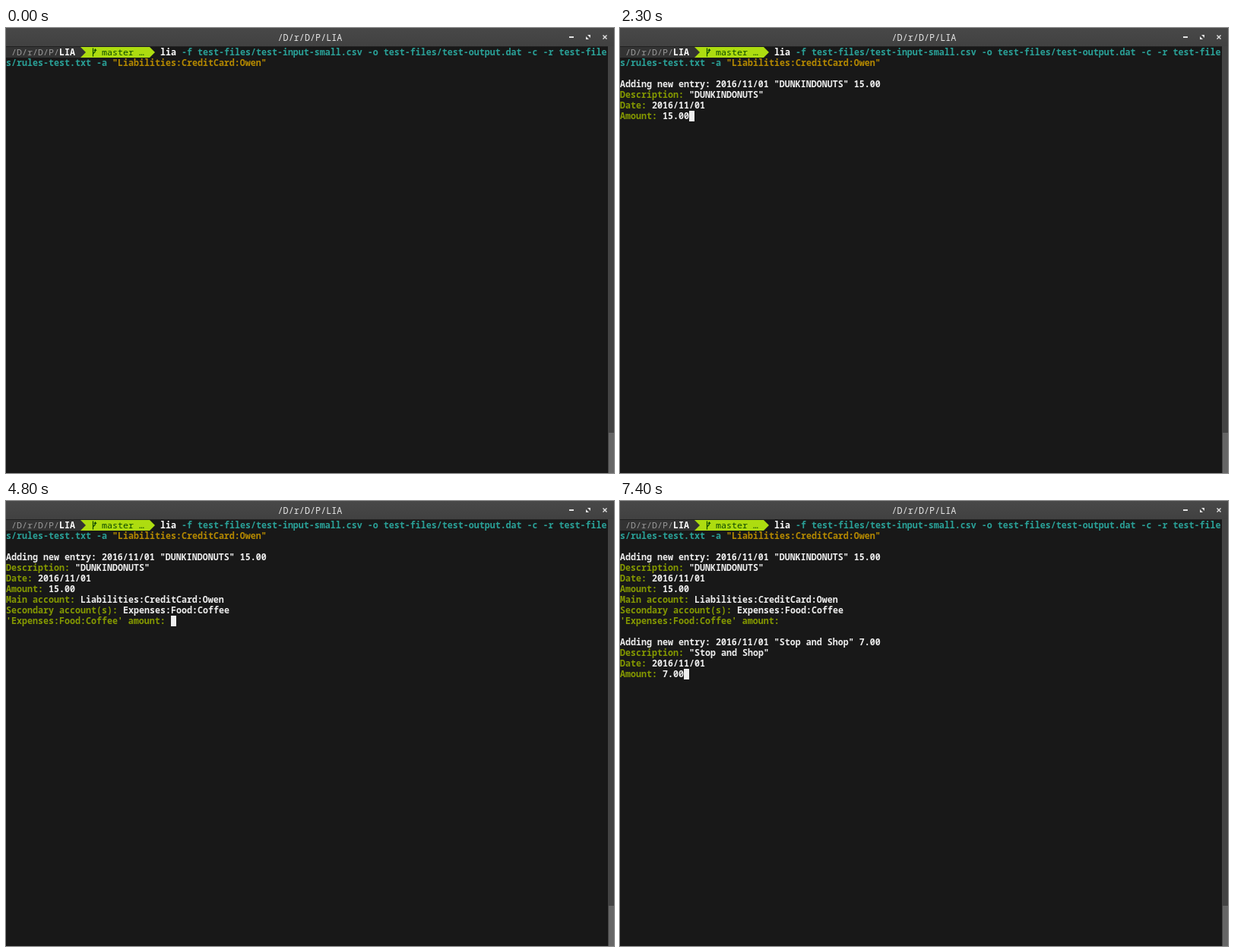
These frames come from a looping animation (800 by 586 pixels, 8000 ms). An HTML page:

```html
<!DOCTYPE html>
<html lang="en">
<head>
<meta charset="utf-8">
<title>Terminal</title>
<style>
  html, body { margin: 0; width: 100%; height: 100%; overflow: hidden; background: #181818; }
  svg { display: block; width: 800px; height: 586px; }
  text { font: 700 11.667px "Noto Sans Mono", "DejaVu Sans Mono", monospace; white-space: pre; }
  .title { font-weight: 500; font-size: 11.8px; fill: #e4e4e4; }
  .path { font-weight: 500; }
</style>
</head>
<body>
<svg id="stage" viewBox="0 0 800 586">
  <defs>
    <linearGradient id="bar" x2="0" y2="1">
      <stop stop-color="#484848"/>
      <stop offset="1" stop-color="#414141"/>
    </linearGradient>
  </defs>
  <rect width="800" height="586" fill="#181818"/>
  <rect width="800" height="24" fill="url(#bar)"/>
  <rect y="24" width="800" height="1" fill="#202020"/>
  <text class="title" x="357.5" y="17">/D/r/D/P/LIA</text>
  <g stroke="#e4e4e4" fill="none">
    <path d="M741 12h6" stroke-width="2"/>
    <path d="M785.5 9.5l5 5m0-5l-5 5" stroke-width="1.4"/>
    <path d="M765 9h4v4zM763 11v4h4z" fill="#e4e4e4" stroke="none"/>
  </g>
  <rect x="792" y="24" width="8" height="562" fill="#434343"/>
  <rect x="793" y="533" width="7" height="53" fill="#666"/>

  <rect y="25" width="98" height="14" fill="#333"/>
  <path d="M98 25h91l7 7-7 7h-91z" fill="#addc10"/>
  <path d="M98 25l7 7-7 7z" fill="#333"/>
  <path d="M114.5 26.5v11m0-3c0-2 3-1.500 3-5v-1m-1.500 1.500l1.500-2 1.500 2" fill="none" stroke="#0c4801" stroke-width="1.2"/>
  <g id="screen"></g>
  <rect id="cursor" width="7" height="14" fill="#eee"/>
</svg>
<script>
const CELL_W = 7, CELL_H = 14, TOP = 25, LOOP = 8000, BLINK = 600;
const WHITE = '#eee', GREEN = '#859900', CYAN = '#2aa198', GOLD = '#b58900';
const screen = document.getElementById('screen');
const cursor = document.getElementById('cursor');

function write(col, row, content, fill, className = '') {
  const node = document.createElementNS('http://www.w3.org/2000/svg', 'text');
  node.setAttribute('x', col * CELL_W);
  node.setAttribute('y', TOP + row * CELL_H + 11);
  node.setAttribute('fill', fill);
  node.setAttribute('class', className);
  node.textContent = content;
  screen.append(node);
  return node;
}

write(1, 0, '/D/r/D/P/', '#999', 'path');
write(10, 0, 'LIA', '#fff');
write(18, 0, 'master …', '#0c4801', 'path');
write(29, 0, 'lia', '#fff');
write(33, 0, '-f test-files/test-input-small.csv -o test-files/test-output.dat -c -r test-file', CYAN);
write(0, 1, 's/rules-test.txt -a', CYAN);
write(20, 1, '"Liabilities:CreditCard:Owen"', GOLD);

// Each entry: time shown, row, prompt label, value
const lines = [
  [500, 3, '', 'Adding new entry: 2016/11/01 "DUNKINDONUTS" 15.00'],
  [500, 4, 'Description: ', '"DUNKINDONUTS"'],
  [1400, 5, 'Date: ', '2016/11/01'],
  [2300, 6, 'Amount: ', '15.00'],
  [3000, 7, 'Main account: ', 'Liabilities:CreditCard:Owen'],
  [4000, 8, 'Secondary account(s): ', 'Expenses:Food:Coffee'],
  [4800, 9, "'Expenses:Food:Coffee' amount: ", ''],
  [5700, 11, '', 'Adding new entry: 2016/11/01 "Stop and Shop" 7.00'],
  [5700, 12, 'Description: ', '"Stop and Shop"'],
  [6600, 13, 'Date: ', '2016/11/01'],
  [7400, 14, 'Amount: ', '7.00']
].map(([time, row, label, value]) => ({
  time, row,
  end: label.length + value.length,
  nodes: [write(0, row, label, GREEN), write(label.length, row, value, WHITE)]
}));

// Every key press makes the cursor solid and restarts its blink
const keyTimes = [100, 500, 1300, 2200, 3000, 4000, 4800, 5700, 6600, 7400];

function render(t) {
  let place = { end: 49, row: 1 };
  for (const line of lines) {
    const shown = t >= line.time;
    for (const node of line.nodes) node.style.display = shown ? '' : 'none';
    if (shown) place = line;
  }
  cursor.setAttribute('x', place.end * CELL_W);
  cursor.setAttribute('y', TOP + place.row * CELL_H);
  const lit = keyTimes.some(key => t >= key && t < key + BLINK);
  cursor.style.display = lit ? '' : 'none';
}

const start = performance.now();
function tick() {
  render((performance.now() - start) % LOOP);
  requestAnimationFrame(tick);
}
tick();
</script>
</body>
</html>
```
